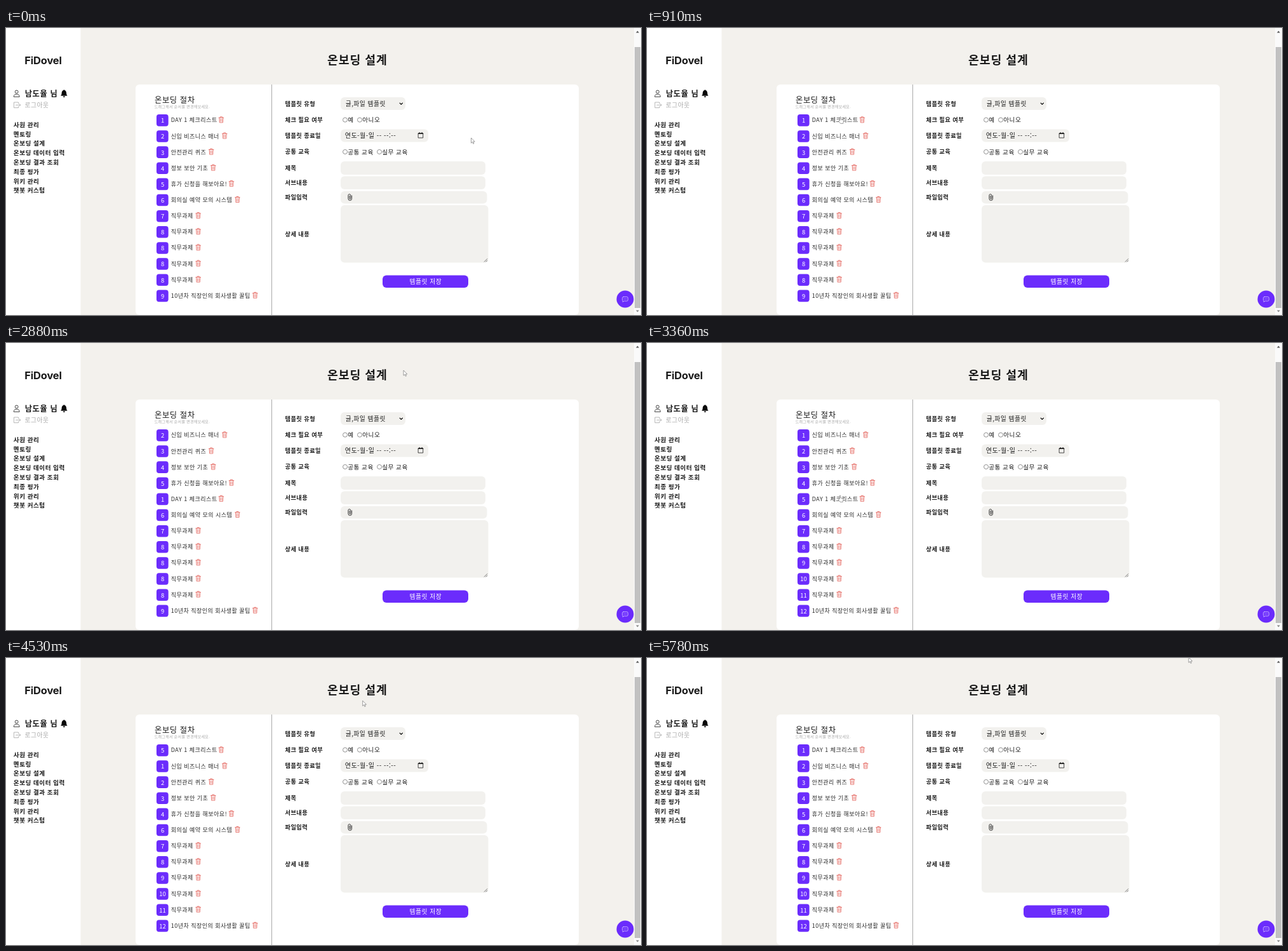
Write an HTML page that moves like this. It is 1000 by 452 pixels and loops after 5840 ms.

```html
<!DOCTYPE html>
<html lang="ko">
<head>
<meta charset="utf-8">
<title>온보딩 설계</title>
<style>
html, body { margin: 0; width: 100%; height: 100%; overflow: hidden; background: #f3f1ed; }
svg { display: block; width: 1000px; height: 452px; }
text { font-family: "Noto Sans CJK KR", "Noto Sans CJK", "Noto Sans", sans-serif; letter-spacing: .05em; white-space: pre; }
text.brand { font-family: Inter, "Liberation Sans", sans-serif; letter-spacing: -.01em; }
</style>
</head>
<body>
<svg id="stage" viewBox="0 0 1000 452"></svg>
<script>
const LOOP = 5840;
const PURPLE = '#6b2cfc', FIELD = '#f2f1ee', INK = '#1a1a1a';
const stage = document.getElementById('stage');

function el(tag, attrs, parent = stage) {
  const node = document.createElementNS('http://www.w3.org/2000/svg', tag);
  for (const key in attrs) node.setAttribute(key, attrs[key]);
  parent.appendChild(node);
  return node;
}
function box(x, y, width, height, rx, fill, parent) {
  return el('rect', { x, y, width, height, rx, fill }, parent);
}
// cy is the vertical middle of the glyphs
function label(str, x, cy, size, opts = {}, parent) {
  const node = el('text', { x, y: cy + size * 0.37, 'font-size': size, fill: INK, ...opts }, parent);
  node.textContent = str;
  return node;
}
function line(d, stroke = INK, width = 1, opts = {}, parent) {
  return el('path', {
    d, stroke, fill: 'none', 'stroke-width': width,
    'stroke-linecap': 'round', 'stroke-linejoin': 'round', ...opts
  }, parent);
}
const bold = { 'font-weight': 700 };

function drawSidebar() {
  box(0, 0, 117.5, 452, 0, '#fff');
  el('text', { class: 'brand', x: 58.5, y: 57, 'font-size': 16.5, 'font-weight': 700, 'text-anchor': 'middle', fill: '#1b1b1b' })
    .textContent = 'FiDovel';

  el('circle', { cx: 16.7, cy: 100.5, r: 2.4, fill: 'none', stroke: '#333', 'stroke-width': 0.9 });
  line('M12.2 108c0-2.8 1.8-3.7 4.5-3.7s4.5.9 4.5 3.7z', '#333', 0.9);
  label('남도율 님', 29.7, 103, 12.3, bold);
  el('path', { d: 'M86 106.8c1.4-1.2 1.5-2.6 1.7-4.6.2-2.2 1.2-3.7 2.8-4.1a.9.9 0 0 1 1.8 0c1.6.4 2.6 1.9 2.8 4.1.2 2 .3 3.4 1.7 4.6zM89.8 107.6h3.2a1.6 1.6 0 0 1-3.2 0z', fill: '#0a0a0a' });

  line('M19.5 118.8V117h-7v8.6h7v-1.8M15.5 121.3h7.3M20.8 119.3l2 2-2 2', '#a8a8a8', 0.8);
  label('로그아웃', 29.5, 121, 9.8, { fill: '#a8a8a8' });

  const menu = ['사원 관리', '멘토링', '온보딩 설계', '온보딩 데이터 입력', '온보딩 결과 조회', '최종 평가', '위키 관리', '챗봇 커스텀'];
  menu.forEach((str, i) => label(str, 11.8, 152.3 + i * 14.8, 9.65, bold));
}

function drawForm() {
  const names = [
    ['템플릿 유형', 119.5], ['체크 필요 여부', 145], ['템플릿 종료일', 170], ['공통 교육', 195],
    ['제목', 220.5], ['서브내용', 244], ['파일입력', 267], ['상세 내용', 325]
  ];
  names.forEach(([str, y]) => label(str, 439.5, y, 9.2, bold));

  box(527, 109, 102, 20, 6, FIELD);
  label('글,파일 템플릿', 534.7, 119.2, 9.75);
  line('M620.2 118.2l2.1 2.2 2.1-2.2', INK, 1.3);

  box(527, 159.5, 138, 20, 6, FIELD);
  label('연도-월-일 -- --:--', 533.7, 169.3, 10);
  line('M649.5 165.8h7.2v7.2h-7.2z', INK, 0.8);
  line('M649.5 166.4h7.2M651.2 164.7v1M655 164.7v1', INK, 1.2);

  const radios = [[534, 144.7, '예'], [557, 144.7, '아니오'], [534, 195, '공통 교육'], [588, 195, '실무 교육']];
  radios.forEach(([x, y, str]) => {
    el('circle', { cx: x, cy: y, r: 3.5, fill: '#fff', stroke: '#777', 'stroke-width': 0.8 });
    label(str, x + 4.3, y, 9.6);
  });

  box(527, 210, 228, 21, 6, FIELD);
  box(527, 233.5, 228, 20.5, 6, FIELD);
  box(527, 257, 230.5, 19.5, 6, FIELD);
  line('M544.5 264v4.8a2.8 2.8 0 0 1-5.6 0v-5.2a1.9 1.9 0 0 1 3.8 0v5a.9.9 0 0 1-1.8 0v-4.2', '#222', 0.9);
  box(527, 279, 232.5, 90.5, 6, FIELD);
  line('M753.2 368.2l4.6-4.6M756 368.2l1.8-1.8', '#555', 0.8);

  box(593, 389.5, 135, 19.5, 6, PURPLE);
  label('템플릿 저장', 635.5, 399.3, 9.8, { fill: '#fff' });
}

function drawChrome() {
  el('circle', { cx: 975, cy: 427, r: 13.5, fill: PURPLE });
  line('M972.4 423.4h5.2a1.8 1.8 0 0 1 1.8 1.8v3a1.8 1.8 0 0 1-1.8 1.8h-4.2l-2.2 1.4.2-1.6a1.8 1.8 0 0 1-.8-1.6v-3a1.8 1.8 0 0 1 1.8-1.8z', '#e4d9ff', 0.7);
  [973, 975, 977].forEach(cx => el('circle', { cx, cy: 426.8, r: 0.55, fill: '#e4d9ff' }));

  box(989, 0, 11, 452, 0, '#fafafa');
  box(990, 30, 9, 411, 0, '#c1c1c1');
  el('path', { d: 'M992 7.5l2.5-3 2.5 3z', fill: '#555' });
  el('path', { d: 'M992 444.5l2.5 3 2.5-3z', fill: '#888' });
}

const TASK = ['직무과제', 302.7];
const items = [
  ['DAY 1 체크리스트', 338.9], ['신입 비즈니스 매너', 344.3], ['안전관리 퀴즈', 323.2],
  ['정보 보안 기초', 326.3], ['휴가 신청을 해보아요!', 355], ['회의실 예약 모의 시스템', 364.5],
  TASK, TASK, TASK, TASK, TASK, ['10년차 직장인의 회사생활 꿀팁', 392.3]
];
const rowY = i => 145.3 + i * 25.13;

function drawItem([str, trashX]) {
  const g = el('g', {});
  box(237, -9.2, 18.7, 18.6, 4, PURPLE, g);
  const num = label('', 246.6, 0.4, 9.6, { fill: '#fff', 'text-anchor': 'middle', style: 'letter-spacing:0' }, g);
  label(str, 259.7, -0.2, 9.05, { fill: '#2a2a2a' }, g);
  line('M-3.8 -3.3H3.8M-1.5 -3.4V-4.7H1.5V-3.4M-3 -3.2L-2.6 4.4H2.6L3 -3.2M-1.1 -1.4V2.7M1.1 -1.4V2.7',
    '#e2574f', 0.75, { transform: `translate(${trashX} -.8)` }, g);
  return { g, num };
}

box(0, 0, 1000, 452, 0, '#f3f1ed');
drawSidebar();
label('온보딩 설계', 506, 50, 18.3, bold);
box(204, 89, 698, 363, 6, '#fff');
box(418, 89, 1, 363, 0, '#a9a9a9');
label('온보딩 절차', 234, 113, 12.3, { 'font-weight': 500 });
label('드래그해서 순서를 변경해보세요.', 233.7, 123.3, 6, { fill: '#a8a8a8' });
const rows = items.map(drawItem);
drawForm();
drawChrome();

const cursorLook = { fill: '#fff', stroke: '#777', 'stroke-width': 0.7, 'stroke-linejoin': 'round' };
const arrow = el('path', { d: 'M0 0V8.2L1.9 6.5 3.2 9.4 4.5 8.8 3.2 6H5.8Z', ...cursorLook });
const hand = el('path', {
  d: 'M-.8 6V.7a.8.8 0 0 1 1.6 0V4l3.4.9q1 .3.8 1.4L4.4 10.4H.2L-2.7 7.1q-.6-1 .5-1.2z', ...cursorLook
});

// list order and numbering
const DROP_1 = 1690, SAVE_1 = 2910, DROP_2 = 4130, SAVE_2 = 5110;
const seq = items.map((_, i) => i + 1);
const initial = seq.map(n => n < 9 ? n : n < 12 ? 8 : 9);
const moved = seq.map((_, i) => i === 0 ? 4 : i < 5 ? i - 1 : i);
const home = seq.map((_, i) => i);

function listAt(t) {
  const pos = t >= DROP_1 && t < DROP_2 ? moved : home;
  const nums = t < SAVE_1 ? initial : t < SAVE_2 ? moved.map(p => p + 1) : seq;
  return { pos, nums };
}

// time, x, y of the pointer tip
const path = [
  [0, 732.5, 173], [40, 732.5, 173], [170, 722, 172], [320, 722, 172], [840, 306, 141],
  [910, 304.5, 140], [1220, 304.5, 140], [1300, 300, 237], [1690, 300, 237], [1890, 299.5, 236],
  [2200, 420, 130], [2290, 440, 118], [2550, 626, 43], [2880, 626, 43], [3360, 304, 240],
  [3470, 304, 240], [3680, 312.5, 148.5], [4130, 312.5, 148.5], [4630, 590, 58],
  [4730, 600, 51], [4900, 602.5, 49], [5250, 602.5, 49], [5670, 835, 12], [5780, 853, -1], [LOOP, 853, -1]
];

function pointerAt(t) {
  let i = 1;
  while (i < path.length - 1 && path[i][0] <= t) i++;
  const [t0, x0, y0] = path[i - 1], [t1, x1, y1] = path[i];
  const u = Math.min(1, (t - t0) / (t1 - t0));
  const k = u * u * (3 - 2 * u);
  return [x0 + (x1 - x0) * k, y0 + (y1 - y0) * k];
}

function render(t) {
  const { pos, nums } = listAt(t);
  rows.forEach((row, i) => {
    row.g.setAttribute('transform', `translate(0 ${rowY(pos[i])})`);
    if (row.num.textContent !== String(nums[i])) row.num.textContent = nums[i];
  });
  const [x, y] = pointerAt(t);
  const overList = x > 234 && x < 400 && y > 133;
  const move = `translate(${x.toFixed(2)} ${y.toFixed(2)})`;
  arrow.setAttribute('transform', move);
  hand.setAttribute('transform', move);
  arrow.setAttribute('visibility', overList ? 'hidden' : 'visible');
  hand.setAttribute('visibility', overList ? 'visible' : 'hidden');
}

const start = performance.now();
function tick() {
  render((performance.now() - start) % LOOP);
  requestAnimationFrame(tick);
}
tick();
</script>
</body>
</html>
```
